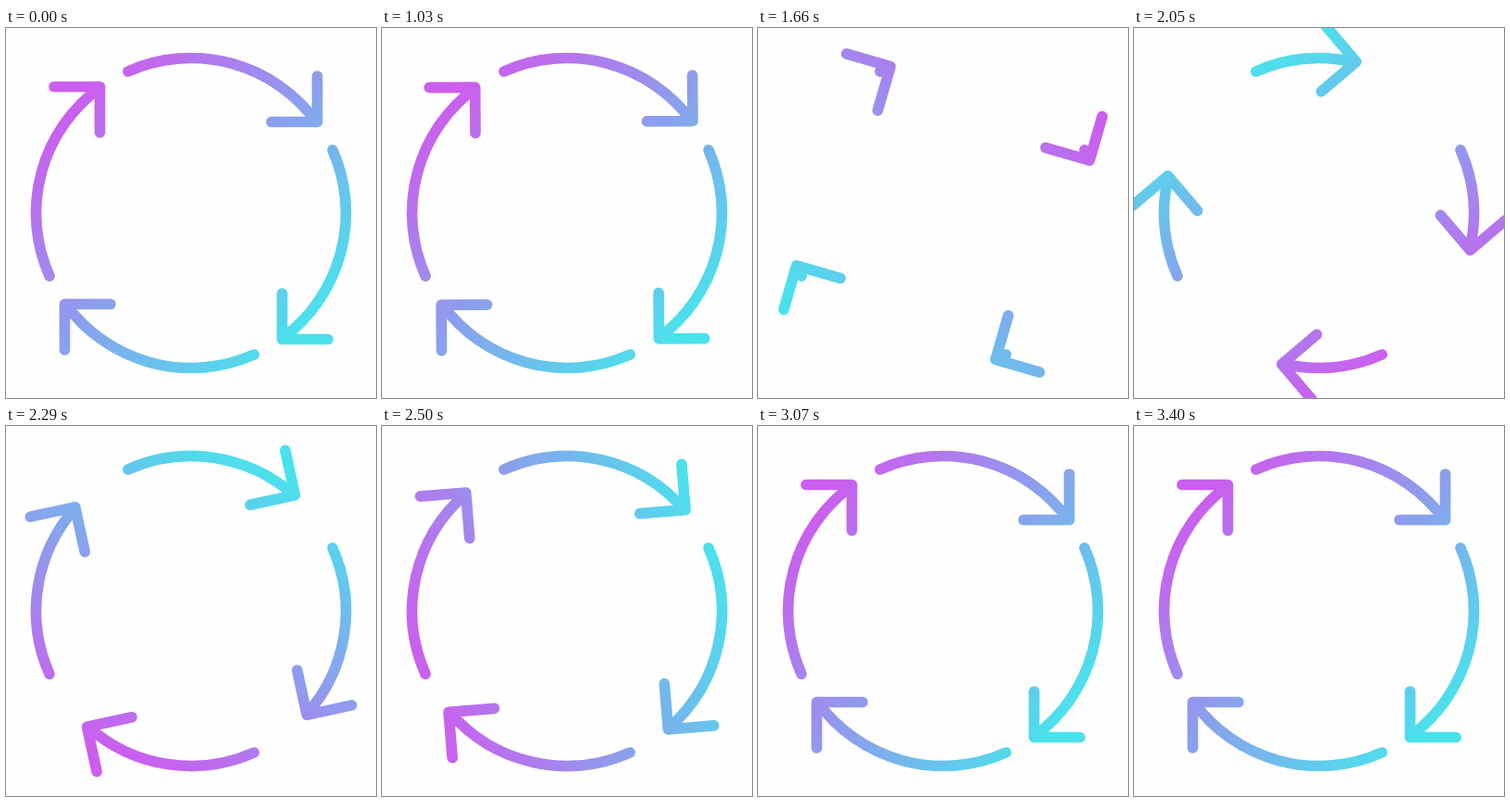
An HTML page with a canvas for the animation above (3430 ms loop, 400x400 px).

```html
<!DOCTYPE html>
<html lang="en">
<head>
<meta charset="utf-8">
<title>Cycle arrows</title>
<style>
  html, body { margin: 0; width: 100%; height: 100%; overflow: hidden; background: #fefefe; }
  canvas { display: block; width: 400px; height: 400px; }
</style>
</head>
<body>
<canvas id="stage" width="400" height="400"></canvas>
<script>
const ctx = document.getElementById('stage').getContext('2d');
const RAD = Math.PI / 180;
const LOOP = 3430, STEP = 30, START = 1000, TURN = 1620, SETTLED = 3000, END = 3400;
const RADIUS = 167.5, TAIL = -114, TIP = -36, RETRACT = 74;
const GRADIENT_REACH = 175;

// Cubic bezier easing with control points (x1, 0) and (x2, 1).
function ease(x, x1, x2) {
  if (x <= 0) return 0;
  if (x >= 1) return 1;
  let low = 0, high = 1;
  for (let i = 0; i < 30; i++) {
    const s = (low + high) / 2, r = 1 - s;
    if (3 * r * r * s * x1 + 3 * r * s * s * x2 + s * s * s < x) low = s;
    else high = s;
  }
  return low * low * (3 - 2 * low);
}

const progress = (t, from, to) => (t - from) / (to - from);

function retraction(t) {
  return t < TURN
    ? RETRACT * ease(progress(t, START, TURN), 0.4, 0.685)
    : RETRACT * (1 - ease(progress(t, TURN, SETTLED), 0.525, 0));
}

function gradientAt(degrees) {
  const dx = GRADIENT_REACH * Math.cos(degrees * RAD);
  const dy = GRADIENT_REACH * Math.sin(degrees * RAD);
  const gradient = ctx.createLinearGradient(200 - dx, 200 - dy, 200 + dx, 200 + dy);
  gradient.addColorStop(0, '#cb5eee');
  gradient.addColorStop(1, '#4be1ec');
  return gradient;
}

// Paths keep the rotation, while the stroke gradient stays in stage space.
function addArrow(path, quarter, back) {
  const arrow = new Path2D();
  arrow.arc(0, 0, RADIUS, TAIL * RAD, (TIP - back) * RAD);
  const head = new Path2D();
  head.moveTo(136.5, -148);
  head.lineTo(136.5, -98.5);
  head.lineTo(87, -98.5);
  arrow.addPath(head, new DOMMatrix().rotate(-back));
  path.addPath(arrow, new DOMMatrix().translate(200, 200).rotate(quarter * 90));
}

function draw(time) {
  const t = START + Math.floor((time - START) / STEP) * STEP;
  const back = retraction(t);
  const arrows = new Path2D();
  for (let quarter = 0; quarter < 4; quarter++) addArrow(arrows, quarter, back);

  ctx.fillStyle = '#fefefe';
  ctx.fillRect(0, 0, 400, 400);
  ctx.strokeStyle = gradientAt(45 + 360 * ease(progress(t, START, END), 0.347, 0.43));
  ctx.lineWidth = 11.7;
  ctx.lineCap = ctx.lineJoin = 'round';
  ctx.stroke(arrows);
}

function tick() {
  draw(performance.now() % LOOP);
  requestAnimationFrame(tick);
}
tick();
</script>
</body>
</html>
```
